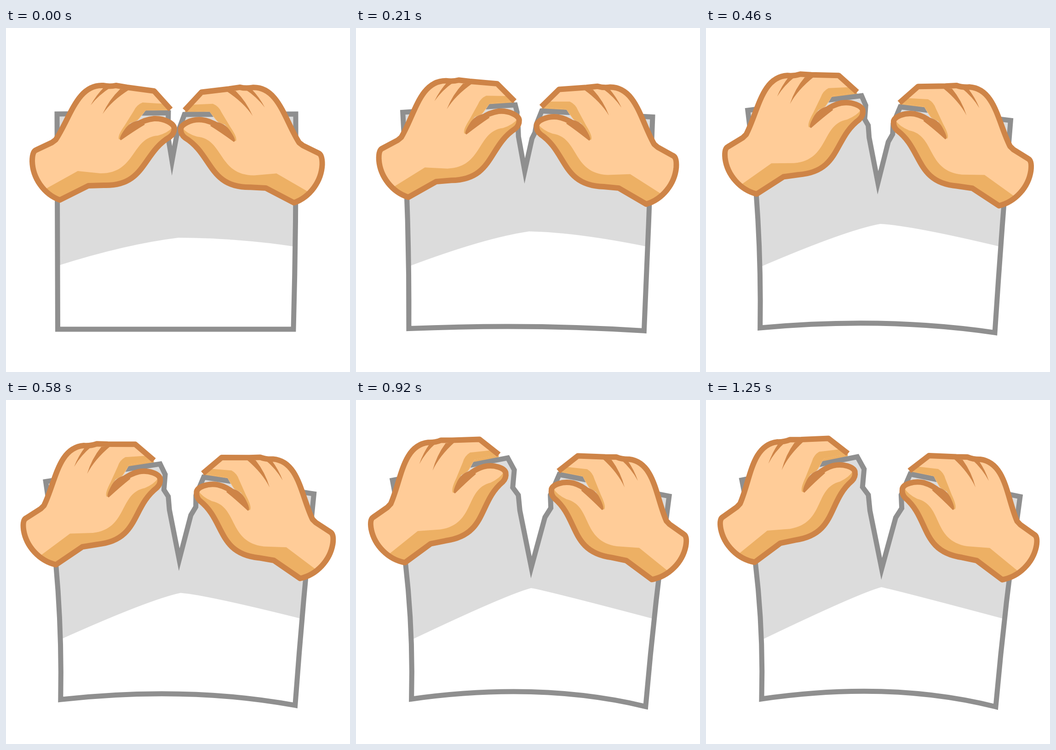
An HTML page with a canvas that plays this animation: 748x748 px, repeating every 2 s.

```html
<!DOCTYPE html>
<html lang="en">
<head>
<meta charset="utf-8">
<title>Tearing paper</title>
<style>
html, body { margin: 0; width: 100%; height: 100%; overflow: hidden; background: #fff; }
canvas { display: block; width: 748px; height: 748px; }
</style>
</head>
<body>
<canvas id="stage" width="748" height="748"></canvas>
<script>
const ctx = document.getElementById('stage').getContext('2d');
const LOOP = 2000, STEPS = 30, STEP_MS = 1000 / 24;
const SKIN = '#ffcc98', SHADE = '#edb064', LINE = '#ce8447';
const PAPER = '#dcdcdc', EDGE = '#8f8f8f';

// Both hands share this outline; the right one is mirrored.
const WRIST = [115, 380];
const OUTLINE = 'M358 177L322 137L263 129L239 125Q226 128 211 125C155 122 140 195 108 243' +
  'L100 249L66 265Q57 268 57 290C58 326 82 361 117 374L179 343L212 342' +
  'C303 345 296 272 356 237Q366 230 366 218C365 208 345 196 322 197Q302 199 285 210';
const outline = new Path2D(OUTLINE);
const body = new Path2D(OUTLINE + 'L248 243Q255 222 270 207L288 200L304 179Z');
const palmShade = new Path2D('M84 351L156 311L205 316C283 317 272 238 330 234' +
  'Q352 228 362 216L376 240L270 352L110 388Z');
const fingerShade = new Path2D('M346 165L297 162Q284 167 278 180L258 212Q243 233 245 241' +
  'Q249 245 256 236L304 179L360 179Z');
const hiddenFinger = new Path2D('M346 165L300 165L300 196L344 196L358 180Z');
const creases = new Path2D('M250 244Q243 242 257 222Q270 202 292 201L302 210Q280 223 250 244Z' +
  'M214 128Q196 146 184 168Q202 145 228 129ZM248 133Q224 156 210 187Q230 158 268 134Z');

const mix = (a, b, p) => a + (b - a) * p;
const ease = x => 1 - (1 - x) ** 3 * (1 + 1.45 * x);

function progress(ms) {
  // Steps fall on hundredths of a second.
  const step = Math.floor((ms + 5) / STEP_MS);
  const startsAt = 10 * Math.floor(step * STEP_MS / 10 + .5);
  return ease(Math.min(startsAt > ms ? step - 1 : step, STEPS) / STEPS);
}

// Torn edge: [share of the way down, sideways offset] for each corner.
function tornEdge([x0, y0], [x1, y1], jags, p) {
  return jags.map(([f, offset]) => [mix(x0, x1, f) + mix(-10 * f, offset, p), mix(y0, y1, f)]);
}

function bow([x0, y0], [x1, y1], dx, dy) {
  return [(x0 + x1) / 2 + dx, (y0 + y1) / 2 + dy, x1, y1];
}

function drawPaper(p) {
  const moved = (x, y, dx, dy) => [x + dx * p, y + dy * p];
  const tip = moved(361, 289, 21, 78);
  const tornLeft = moved(353, 184.5, -24, -61), tornRight = moved(388, 188, 56, -27);
  const topLeft = moved(111, 187, -33, -13), topRight = moved(630, 187, 53, 23);
  const bottomLeft = moved(112.5, 655, 8.5, -5), bottomRight = moved(625, 655, 5, 12);
  const crestLeft = moved(112, 517, 8, 5), crestTop = moved(375, 456, 6, -49);
  const crestRight = moved(632, 476, 20, 1);

  const sheet = new Path2D();
  sheet.moveTo(...tornRight);
  [
    ...tornEdge(tornRight, tip, [[.22, -6], [.36, 4], [.46, -3]], p),
    tip,
    ...tornEdge(tornLeft, tip, [[.11, 9], [.27, -3], [.34, 6], [.48, 2]], p).reverse(),
    tornLeft,
    topLeft
  ].forEach(point => sheet.lineTo(...point));
  sheet.quadraticCurveTo(...bow(topLeft, bottomLeft, 28 * p, 0));
  sheet.quadraticCurveTo(...bow(bottomLeft, bottomRight, 25 * p, -49 * p));
  sheet.quadraticCurveTo(...bow(bottomRight, topRight, 4 - 10 * p, 0));
  sheet.closePath();

  ctx.fillStyle = PAPER;
  ctx.fill(sheet);
  ctx.save();
  ctx.clip(sheet);
  ctx.fillStyle = '#fff';
  ctx.beginPath();
  ctx.moveTo(...crestLeft);
  ctx.quadraticCurveTo(...moved(260, 470, 70, -49), ...crestTop);
  ctx.quadraticCurveTo(...moved(510, 457, -102, -45), ...crestRight);
  ctx.lineTo(700, 748);
  ctx.lineTo(60, 748);
  ctx.fill();
  ctx.restore();

  ctx.strokeStyle = EDGE;
  ctx.lineWidth = 11;
  ctx.lineJoin = 'miter';
  ctx.miterLimit = 20;
  ctx.stroke(sheet);
}

function drawFinger() {
  ctx.fillStyle = SHADE;
  ctx.fill(hiddenFinger);
}

function drawHand() {
  ctx.fillStyle = SKIN;
  ctx.fill(body);
  ctx.save();
  ctx.clip(body);
  ctx.fillStyle = SHADE;
  ctx.fill(palmShade);
  ctx.fill(fingerShade);
  ctx.restore();
  ctx.fillStyle = ctx.strokeStyle = LINE;
  ctx.fill(creases);
  ctx.lineWidth = 12;
  ctx.lineJoin = 'round';
  ctx.stroke(outline);
}

function atHands(p, paint) {
  const place = (x, y, degrees, flip) => {
    ctx.save();
    ctx.translate(x, y);
    ctx.rotate(degrees * Math.PI / 180);
    ctx.scale(flip, 1);
    ctx.translate(-WRIST[0], -WRIST[1]);
    paint();
    ctx.restore();
  };
  place(mix(115, 105, p), mix(380, 359, p), mix(0, -10.1, p), 1);
  place(mix(628, 645, p), mix(386, 397, p), mix(1, 10.3, p), -1);
}

function draw(ms) {
  const p = progress(ms % LOOP);
  ctx.fillStyle = '#fff';
  ctx.fillRect(0, 0, 748, 748);
  atHands(p, drawFinger);
  drawPaper(p);
  atHands(p, drawHand);
}

const start = performance.now();
function tick() {
  draw(performance.now() - start);
  requestAnimationFrame(tick);
}
tick();
</script>
</body>
</html>
```
